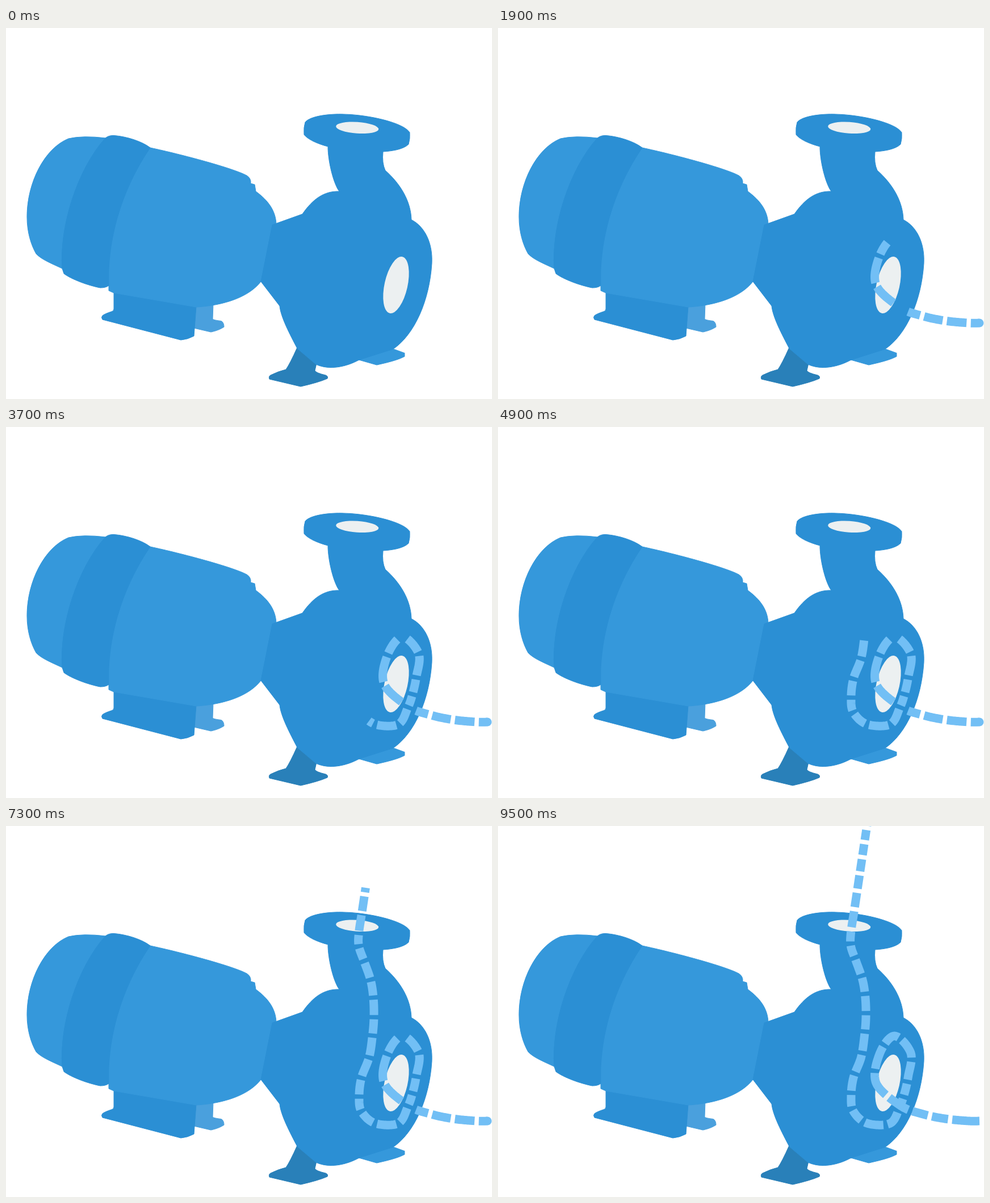
Recreate the animation shown at these times as an HTML page with a canvas. Size 856 by 654 pixels, loop 9.6 s.

```html
<!DOCTYPE html>
<html lang="en">
<head>
<meta charset="utf-8">
<title>Pump flow</title>
<style>
html, body { margin: 0; width: 100%; height: 100%; overflow: hidden; background: #fff; }
canvas { display: block; }
</style>
</head>
<body>
<canvas id="stage" width="856" height="654"></canvas>
<script>
const ctx = document.getElementById('stage').getContext('2d');
const LOOP = 9600, STEP = 100, WIDTH = 15, GAP = 7.5, SAMPLES = 16;
const DARK = '#2b8fd4', LIGHT = '#3598db', SHADE = '#2980b9', FAR = '#4aa0dd';
const PALE = '#ecf0f1', WATER = '#72bff5';

const shapes = {
  motorCap: [LIGHT, 'M110 195Q135 189 176 194L120 430L99 424C82 416 62 408 53 398C44 382 37 360 37 333C37 272 68 212 110 195Z'],
  motorFarFoot: [FAR, 'M333 490L365 486L364 513Q366 515 379 516.5Q384 519 384 527Q375 533 361 536L331 529Z'],
  motorFoot: [DARK, 'M190 464L335 490L331 543Q320 549 308 550L170 514Q167 510 170 507Q173 504 187 499.5Q190 498 190 495Z'],
  motorBody: [LIGHT, 'M244 210L254 211C310 223 400 247 424 260Q432 265 431 274L438 276L440 288C462 304 475 322 476 346L449 447C428 474 385 489 335 492L190 467L181 463L181 455C168 390 190 290 244 210Z'],
  motorBand: [DARK, 'M175 194Q181 189 190 189.5C212 191 240 200 254 211C200 290 178 380 181 454Q176 458 166 458C145 454 115 443 102 433L99 424C94 350 125 250 175 194Z'],
  pumpFarFoot: [LIGHT, 'M618 584L680 565L702 573L702 579Q690 586 653 594Z'],
  pumpFoot: [SHADE, 'M513 563L547 591L544 604Q546 608 563 612Q568 614 566 618Q550 625 519 632L464 619Q462 614 466 612Q480 605 493 602Q500 592 513 563Z'],
  pumpBody: [DARK, 'M469 347L522 328C540 302 560 287 587 288C577 275 567 235 567 209C548 204 531 196 525 188Q524 175 527 166C536 155 570 151 595 152C640 153 700 167 711 184Q712 195 709 205C700 214 680 217 664 218Q662 238 668 251C695 275 713 305 714 338C738 350 752 380 750 415C746 480 720 540 682 566L622 585C600 597 570 604 546 593L513 565C500 540 484 510 482 490L449 447Z']
};
const parts = Object.values(shapes).map(([color, d]) => [color, new Path2D(d)]);

// Key points of the water's route: inlet, spiral, neck; about one dash apart.
const route = [
  [848, 520], [829, 520], [787, 516], [747, 507.5], [709, 493], [666, 453],
  [672, 402], [698, 370], [727, 400], [722.5, 441.5], [716, 471], [708, 494],
  [691, 524], [650, 524], [626, 503], [622, 477], [626, 444], [639.5, 408],
  [645.5, 369.5], [648, 337], [647, 302.5], [642, 271], [630.5, 238], [621.5, 212]
];
// Above the neck the jet runs straight and its dashes grow shorter.
for (let i = 0; i < 8; i++) {
  const rise = 36 * i - i * i;
  route.push([621.5 + 0.15 * rise, 188.5 - rise]);
}
const END = route.length - 1;

function pointAt(u) {
  const i = Math.min(Math.floor(u), END - 1), f = u - i;
  const [p, q, r, s] = [-1, 0, 1, 2].map(k => route[Math.max(0, Math.min(END, i + k))]);
  return [0, 1].map(k => q[k] + f / 2 * (r[k] - p[k]
    + f * (2 * p[k] - 5 * q[k] + 4 * r[k] - s[k]
    + f * (3 * (q[k] - r[k]) + s[k] - p[k]))));
}

// The route as short chords, with the distance travelled at each sample.
const line = Array.from({ length: END * SAMPLES + 1 }, (_, k) => pointAt(k / SAMPLES));
const travelled = [0];
for (let k = 1; k < line.length; k++) {
  const [a, b] = [line[k - 1], line[k]];
  travelled.push(travelled[k - 1] + Math.hypot(b[0] - a[0], b[1] - a[1]));
}
const LENGTH = travelled[travelled.length - 1];

function distanceAt(u) {
  const k = Math.min(Math.floor(u * SAMPLES), line.length - 2);
  return travelled[k] + (travelled[k + 1] - travelled[k]) * (u * SAMPLES - k);
}

// Gaps creep along the route in three poses, further near the inlet.
function gapOffset(i, pose) {
  const creep = 0.2 + 0.75 * Math.exp(-i / 4);
  return [(1 + creep) / 2, 0, creep][pose];
}

// Resting gaps that are wider where the spiral passes the inlet.
const wideGaps = { 4: 30, 7: 20 };

function dashesFor(pose) {
  const dashes = [];
  let from = 0;
  for (let i = 1; i < END; i++) {
    const middle = distanceAt(i + gapOffset(i, pose));
    const half = (pose === 1 && wideGaps[i] || GAP) / 2;
    dashes.push([from, middle - half]);
    from = middle + half;
  }
  return [...dashes, [from, LENGTH]];
}
const poses = [0, 1, 2].map(dashesFor);

// The water slows down slightly on its way.
const reach = seconds => Math.min(LENGTH, 155 * seconds - 3.4 * seconds * seconds);

function pointAlong(distance) {
  const k = Math.max(1, travelled.findIndex(d => d >= distance));
  const f = (distance - travelled[k - 1]) / (travelled[k] - travelled[k - 1]);
  return [0, 1].map(c => line[k - 1][c] + f * (line[k][c] - line[k - 1][c]));
}

function drawDash(from, to) {
  const n = Math.ceil((to - from) / 2);
  ctx.beginPath();
  for (let k = 0; k <= n; k++) ctx.lineTo(...pointAlong(from + (to - from) * k / n));
  ctx.stroke();
}

function fillEllipse(x, y, rx, ry, angle) {
  ctx.beginPath();
  ctx.ellipse(x, y, rx, ry, angle, 0, 2 * Math.PI);
  ctx.fill();
}

function drawPump() {
  ctx.lineWidth = 1;
  for (const [color, path] of parts) {
    ctx.fillStyle = ctx.strokeStyle = color;
    ctx.fill(path);
    ctx.stroke(path);
  }
  ctx.fillStyle = PALE;
  fillEllipse(618.7, 175.8, 37.6, 10, 0.07);
  fillEllipse(687, 453, 20.3, 51, 0.22);
}

function drawWater(step) {
  const tip = reach(step * STEP / 1000), pose = step % 3;
  if (tip <= 0) return;
  ctx.strokeStyle = ctx.fillStyle = WATER;
  ctx.lineWidth = WIDTH;
  for (const [from, to] of poses[pose]) {
    if (from < tip) drawDash(from, Math.min(to, tip));
  }
  if (pose === 1) fillEllipse(...route[0], WIDTH / 2, WIDTH / 2, 0);
}

function frame() {
  const step = Math.floor(performance.now() % LOOP / STEP);
  ctx.fillStyle = '#fff';
  ctx.fillRect(0, 0, 856, 654);
  drawPump();
  drawWater(step);
  requestAnimationFrame(frame);
}
frame();
</script>
</body>
</html>
```
